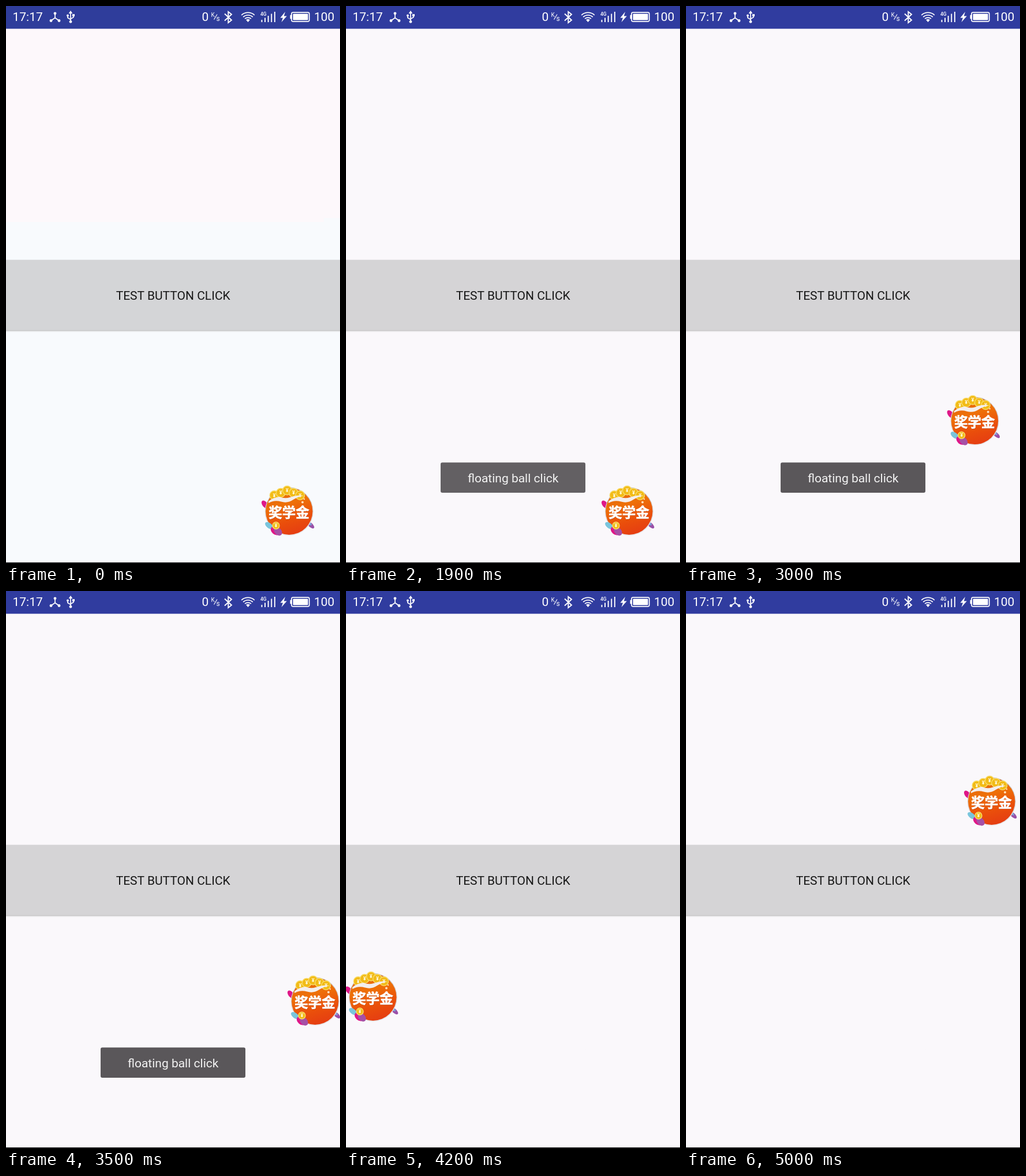
An HTML page that plays this animation: 579x967 px, repeating every 5.1 s.

```html
<!DOCTYPE html>
<html lang="zh-CN">
<head>
<meta charset="utf-8">
<title>Floating ball</title>
<style>
html, body { margin: 0; width: 100%; height: 100%; overflow: hidden; background: #faf8fb; }
svg { display: block; width: 579px; height: 967px; }
text { font-family: Roboto, sans-serif; font-size: 21px; }
.cjk { font: 900 23.5px "Noto Sans CJK SC", "Noto Sans CJK", sans-serif; text-anchor: middle; }
.yen { font-size: 8.5px; font-weight: 700; fill: #fffbe2; text-anchor: middle; }
</style>
</head>
<body>
<svg viewBox="0 0 579 967">
  <defs>
    <linearGradient id="body" x1="0.3" y1="0" x2="0.6" y2="1">
      <stop offset="0" stop-color="#e2660c"/>
      <stop offset="0.35" stop-color="#ee7008"/>
      <stop offset="0.7" stop-color="#ea4f0b"/>
      <stop offset="1" stop-color="#e53d12"/>
    </linearGradient>
    <linearGradient id="edge" x1="0" y1="0" x2="0" y2="1">
      <stop offset="0" stop-color="#c4c3c6"/>
      <stop offset="1" stop-color="#e9e8eb"/>
    </linearGradient>
  </defs>

  <rect width="579" height="967" fill="#faf8fb"/>
  <g id="tint">
    <rect y="39" width="579" height="927" fill="#f8fafd"/>
    <path d="M0 39H579V368H551V375H0Z" fill="#fdf8fb"/>
  </g>
  <rect id="bar" width="579" height="39.5"/>
  <rect y="966" width="579" height="1"/>

  <g fill="#fff">
    <text x="11.5" y="26.3">17:17</text>
    <text x="339.5" y="26.3">0</text>
    <text x="534" y="26.3">100</text>
    <text x="355.5" y="18.5" style="font-size:10px">K</text>
    <text x="364.5" y="26" style="font-size:12px">s</text>
    <text x="441" y="16.5" style="font-size:8.5px;font-weight:500">4G</text>
    <circle cx="85" cy="12.8" r="2.4"/><circle cx="78" cy="25.5" r="2.4"/><circle cx="92" cy="25.5" r="2.4"/>
    <path d="M112 8l3.4 5h-6.8z"/>
    <circle cx="112" cy="27.3" r="2.4"/><circle cx="107" cy="16.5" r="1.9"/><path d="M115 14h4v4h-4z"/>
    <path d="M484 10l-8.5 10.5h4.5l-2.5 7.5 9.3-10.5h-5z"/>
    <rect x="492.5" y="15.5" width="3" height="7" rx="1"/>
    <rect x="497.5" y="13.5" width="26" height="11" rx="1"/>
    <path d="M419.5 28l-3.4-4q3.4-2.4 6.8 0z"/>
    <g id="signal"></g>
  </g>
  <g fill="none" stroke="#fff" stroke-width="1.7">
    <path d="M85 13V20.5L78 25.5M85 20.5L92 25.5"/>
    <path d="M112 11V27M107 17v3.5l5 3M117 17v2.5l-5 3"/>
    <path d="M360.5 23.5L366 14.5" stroke-width="1.2"/>
    <path d="M379 13.5L391 24.5 385.3 29V10L391 14.5 379 25.5" stroke-width="1.9"/>
    <rect x="495" y="11.2" width="30.8" height="15.6" rx="2.5"/>
    <g id="wifi"></g>
  </g>

  <rect id="button" y="440.6" width="579" height="123.4"/>
  <path d="M0 563.5H579" stroke="#c7c6c8" stroke-width="1.4"/>
  <path d="M0 564.8H579" stroke="#e4e3e5" stroke-width="1.2"/>
  <text x="289.7" y="510" text-anchor="middle" fill="#161616">TEST BUTTON CLICK</text>

  <g id="ball">
    <ellipse cx="5" cy="33.5" rx="4.5" ry="8" fill="#df1788" transform="rotate(-38 5 33.5)"/>
    <ellipse cx="84" cy="69" rx="3.6" ry="8" fill="#9a50a8" transform="rotate(-48 84 69)"/>
    <ellipse cx="82" cy="66" rx="2" ry="5" fill="#7ca5d5" transform="rotate(-48 82 66)"/>
    <circle cx="46.8" cy="45.5" r="42" fill="url(#edge)"/>
    <circle cx="46.8" cy="45.2" r="40.7" fill="url(#body)"/>
    <g id="coins"></g>
    <path d="M11 28Q19 21 30 20Q39 24 48 21Q60 16 72 18Q62 20 54 25Q44 32 33 28.5Q21 25 11 31Z" fill="#f3eeee"/>
    <circle cx="70" cy="29.5" r="2" fill="#ffe0ba"/>
    <circle cx="73" cy="24" r="1.2" fill="#ffe0ba"/>
    <ellipse cx="12" cy="70" rx="4.5" ry="8" fill="#79c5dc" transform="rotate(-52 12 70)"/>
    <ellipse cx="23" cy="79" rx="6.5" ry="9" fill="#df1788" transform="rotate(-50 23 79)"/>
    <ellipse cx="27.5" cy="80" rx="5.8" ry="8.5" fill="#a650a6" transform="rotate(-42 27.5 80)"/>
    <g id="front"></g>
    <text class="cjk" x="47" y="57" fill="#9e2f08" opacity=".6">奖学金</text>
    <text class="cjk" x="46.5" y="56" fill="#fff" stroke="#fff" stroke-width=".7">奖学金</text>
  </g>

  <g id="toast">
    <rect x="164" y="792.5" width="251" height="52.5" rx="3" fill="#333033" fill-opacity=".8"/>
    <text x="289.7" y="827" text-anchor="middle" fill="#f3f3f3">floating ball click</text>
  </g>
</svg>
<script>
const LOOP = 5100, STEP = 100;
const el = id => document.getElementById(id);
const repeat = (n, make) => Array.from({ length: n }, (_, i) => make(i)).join('');

const coin = (x, y, r) =>
  `<circle cx="${x}" cy="${y}" r="${r}" fill="#f2bb16" stroke="#f8dc6a" stroke-width="1.4"/>` +
  `<text class="yen" x="${x}" y="${y + 3}">¥</text>`;

el('coins').innerHTML = repeat(5, i => coin(21 + 11.2 * i, 9 + 4.3 * Math.abs(i - 2), 7.8));
el('front').innerHTML = coin(24, 70, 6);

el('signal').innerHTML = repeat(5, i => {
  const h = 4 + 3.5 * i;
  return `<rect x="${442.5 + 5.6 * i}" y="${28 - h}" width="1.9" height="${h}"/>`;
});

el('wifi').innerHTML = repeat(3, i => {
  const r = 8 + 4.3 * i, dx = r * 0.68, y = 28 - r * 0.73;
  return `<path d="M${419.5 - dx} ${y}A${r} ${r} 0 0 1 ${419.5 + dx} ${y}"/>`;
});

// Each move is a curve from the last resting place, bent towards "via".
const home = [444, 832];
const moves = [
  { from: 2600, until: 3200, via: [313, 698], to: [489, 667] },
  { from: 3500, until: 3900, via: [287, 610], to: [84.5, 660] },
  { from: 3900, until: 4200, via: [42, 660], to: [0, 660] },
  { from: 4400, until: 5000, via: [119, 325], to: [483, 320] }
];

const ramp = (t, from, until) => Math.min(1, Math.max(0, (t - from) / (until - from)));
const easeOut = k => 1 - (1 - k) ** 2;

function ballAt(t) {
  return moves.reduce((pos, m) => {
    const u = easeOut(ramp(t, m.from, m.until)), v = 1 - u;
    return pos.map((p, i) => v * v * p + 2 * u * v * m.via[i] + u * u * m.to[i]);
  }, home);
}

const toastAlpha = t => easeOut(ramp(t, 1594, 1994)) * (1 - ramp(t, 3594, 3994) ** 2);

function draw(ms) {
  const t = Math.floor(ms % LOOP / STEP) * STEP;
  const tinted = t < 1500;
  el('tint').style.display = tinted ? '' : 'none';
  el('bar').setAttribute('fill', tinted ? '#2f3d9b' : '#303c9f');
  el('button').setAttribute('fill', tinted ? '#d4d5d7' : '#d5d4d6');
  el('ball').setAttribute('transform', `translate(${ballAt(t)})`);
  el('toast').setAttribute('opacity', toastAlpha(t));
}

const start = performance.now();
function tick() {
  draw(performance.now() - start);
  requestAnimationFrame(tick);
}
tick();
</script>
</body>
</html>
```
